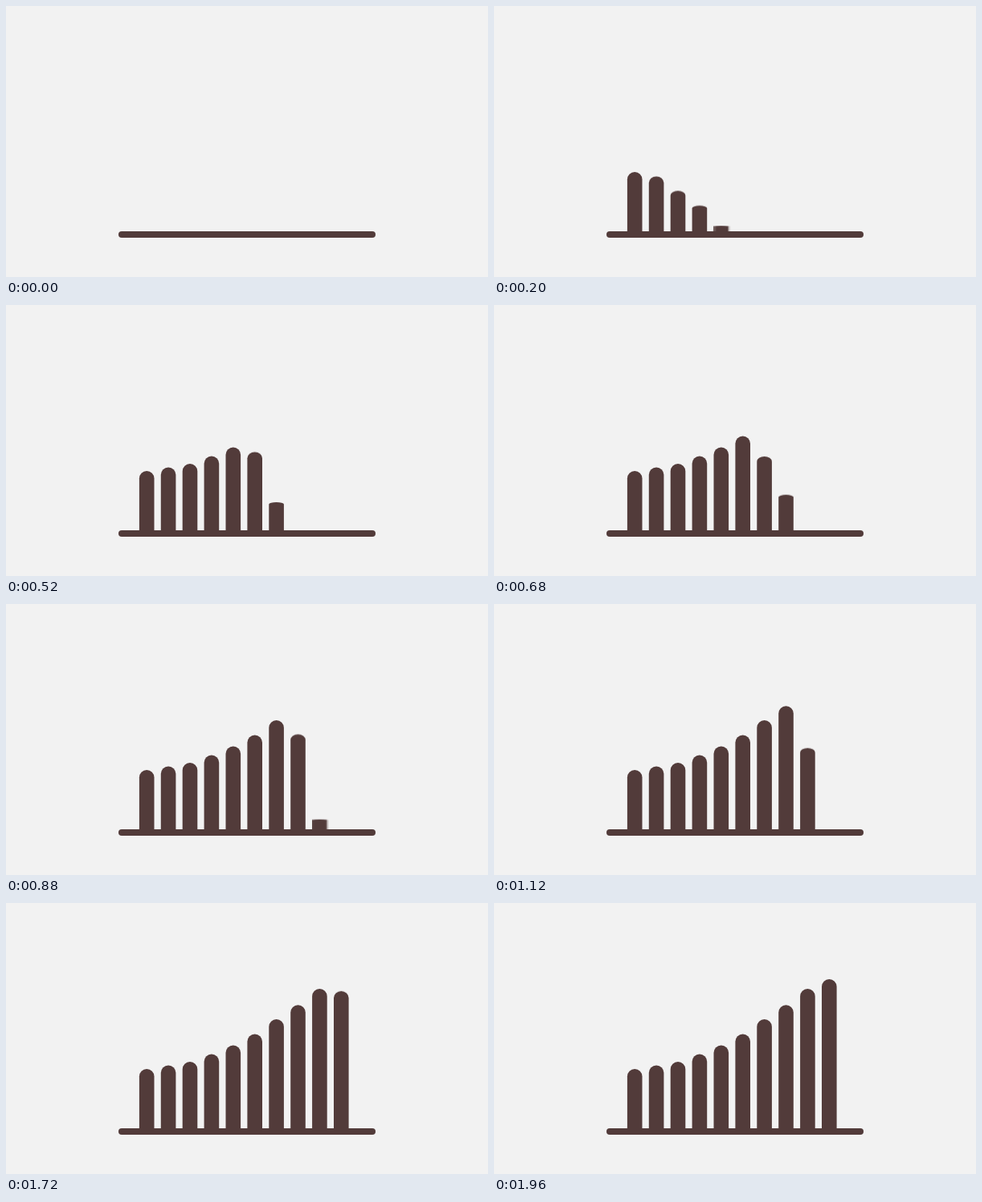
An HTML page for the animation above (2 s loop, 600 by 338 pixels).

```html
<!DOCTYPE html>
<html lang="en">
<head>
<meta charset="utf-8">
<title>Growing bars</title>
<style>
  html, body { margin: 0; width: 100%; height: 100%; overflow: hidden; background: #f2f2f2; }
  svg { display: block; width: 600px; height: 338px; fill: #523b3a; }
  .bar { transform-origin: 0 282px; transform: scaleY(0); }
</style>
</head>
<body>
<svg viewBox="0 0 600 338">
  <g id="bars"></g>
  <rect x="140" y="281" width="320" height="8" rx="4"/>
</svg>
<script>
  const LOOP = 2000, BASE = 282, WIDTH = 18.6, PITCH = 26.9, LEFT = 165.9;

  // top edge, growth start and growth end (ms) of each bar
  const bars = [
    [207, 0, 198], [202.5, 14, 228], [198, 63, 288], [188.5, 111, 365], [177.5, 180, 462],
    [163.5, 276, 570], [145, 420, 804], [127.3, 559, 976], [107, 845, 1317], [95, 1257, 1761]
  ];

  const group = document.getElementById('bars');
  bars.forEach(([top, start, end], i) => {
    const x = LEFT + i * PITCH, r = WIDTH / 2;
    const bar = document.createElementNS('http://www.w3.org/2000/svg', 'path');
    bar.setAttribute('class', 'bar');
    bar.setAttribute('d', `M${x} ${BASE}V${top + r}a${r} ${r} 0 0 1 ${WIDTH} 0V${BASE}z`);
    group.append(bar);

    const flat = 'scaleY(0)', full = 'scaleY(1)';
    const motion = bar.animate([
      { transform: flat, offset: 0 },
      { transform: flat, offset: start / LOOP },
      { transform: full, offset: end / LOOP },
      { transform: full, offset: 1 }
    ], { duration: LOOP, iterations: Infinity });
    motion.startTime = document.timeline.currentTime;
  });
</script>
</body>
</html>
```
